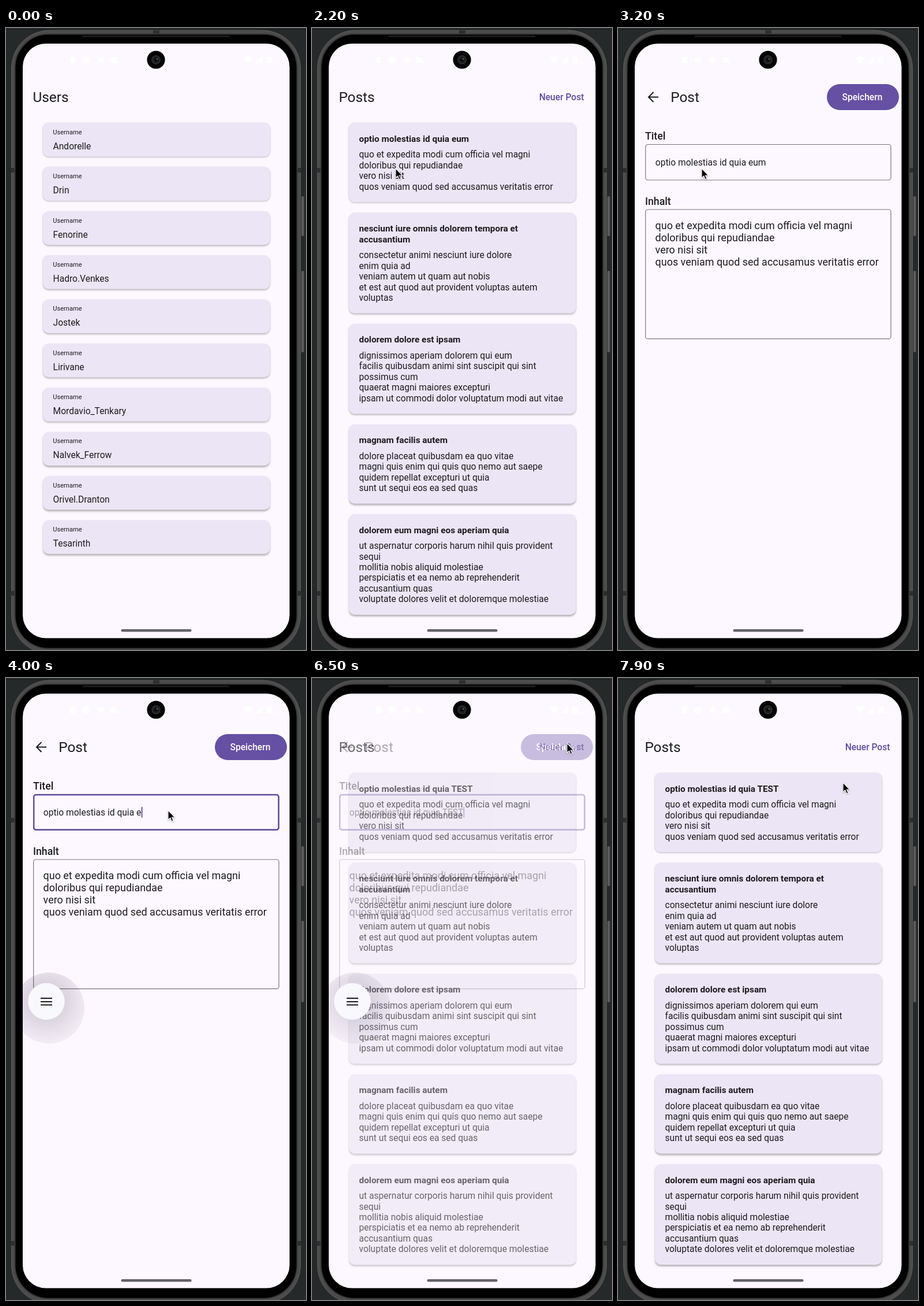
Animation, 520 px wide and 1076 px high, one loop 8000 ms. Source, as an HTML page:

```html
<!DOCTYPE html>
<html lang="de">
<head>
<meta charset="utf-8">
<title>Posts app</title>
<style>
html, body { margin: 0; width: 100%; height: 100%; overflow: hidden; background: #25292a; }
svg { display: block; width: 520px; height: 1076px; }
text { font-family: Roboto, sans-serif; font-size: 15.58px; fill: #1d1b20; white-space: pre; }
.title { font-size: 24.4px; }
.label { font-size: 11.1px; }
.head { font-size: 15.35px; font-weight: 700; }
.field { font-size: 17.8px; font-weight: 500; }
.area { font-size: 17.94px; }
.btn { font-weight: 500; }
.card { fill: #ebe5f5; }
.box { fill: none; stroke: #7a757f; stroke-width: 1.2; }

/* every change is a hard step */
.a {
  animation: 8s step-end infinite backwards;
  animation-delay: calc(var(--d, 0ms) - 20ms);
}
.usersText { animation-name: usersText; }
.usersCards { animation-name: usersCards; }
.postsBar { animation-name: postsBar; }
.postsText { animation-name: postsText; }
.postsCards { animation-name: postsCards; }
.form { animation-name: form; }
.spin { animation-name: spin; }
.focus { animation-name: focus; }
.fab { animation-name: fab; }
.halo { animation-name: halo; }
.caret { animation-name: focus, caret; }
.press { animation-name: press; }
.del { animation-name: del; }
.type { animation-name: type; }
.before { animation-name: before; }
.after { animation-name: after; }
.pointer { animation-name: pointer; }

@keyframes usersText {
  0% { opacity: 1 } 15% { opacity: .8 } 16.25% { opacity: .45 } 17.5% { opacity: .15 }
  18.75% { opacity: .035 } 20% { opacity: .02 } 21.25%, 100% { opacity: 0 }
}
@keyframes usersCards {
  0% { opacity: 1 } 15% { opacity: .95 } 16.25% { opacity: .8 } 17.5% { opacity: .6 }
  18.75% { opacity: .4 } 20% { opacity: .2 } 21.25%, 100% { opacity: 0 }
}
@keyframes postsBar {
  0% { opacity: 0 } 15% { opacity: .1 } 16.25% { opacity: .4 } 17.5% { opacity: .65 }
  18.75% { opacity: .82 } 20% { opacity: .92 } 21.25% { opacity: 1 }
  32.5% { opacity: .65 } 33.75% { opacity: .35 } 35% { opacity: .12 } 36.25% { opacity: 0 }
  80% { opacity: .3 } 81.25% { opacity: .65 } 82.5% { opacity: .9 } 83.75%, 100% { opacity: 1 }
}
@keyframes postsText {
  0% { opacity: 0 } 21.25% { opacity: .85 } 22.5% { opacity: .95 } 23.75% { opacity: 1 }
  32.5% { opacity: .65 } 33.75% { opacity: .33 } 35% { opacity: .12 } 36.25% { opacity: 0 }
  80% { opacity: .3 } 81.25% { opacity: .65 } 82.5% { opacity: .9 } 83.75%, 100% { opacity: 1 }
}
@keyframes postsCards {
  0% { opacity: 0 } 21.25% { opacity: .85 } 22.5% { opacity: .95 } 23.75% { opacity: 1 }
  32.5% { opacity: .45 } 33.75% { opacity: .12 } 35% { opacity: .05 } 36.25% { opacity: 0 }
  80% { opacity: .3 } 81.25% { opacity: .65 } 82.5% { opacity: .9 } 83.75%, 100% { opacity: 1 }
}
@keyframes form {
  0% { opacity: 0 } 32.5% { opacity: .25 } 33.75% { opacity: .56 } 35% { opacity: .8 }
  36.25% { opacity: .93 } 37.5% { opacity: 1 }
  80% { opacity: .7 } 81.25% { opacity: .35 } 82.5% { opacity: .1 } 83.75%, 100% { opacity: 0 }
}
@keyframes spin {
  0% { opacity: 0 }
  15% { opacity: .1; transform: rotate(-190deg) }
  16.25% { opacity: .4; transform: rotate(-130deg) }
  17.5% { opacity: .7; transform: rotate(-65deg) }
  18.75% { opacity: .88; transform: none }
  20% { opacity: .95; transform: rotate(70deg) }
  21.25%, 100% { opacity: 0 }
}
@keyframes focus { 0% { opacity: 0 } 45%, 100% { opacity: 1 } }
@keyframes fab { 0% { opacity: 0 } 46.25% { opacity: 1 } 85% { opacity: .5 } 86.25%, 100% { opacity: 0 } }
@keyframes halo { 0% { opacity: 1 } 81.25% { opacity: .75 } 82.5% { opacity: .55 } 83.75%, 100% { opacity: .4 } }
@keyframes caret {
  0% { transform: translateX(257.9px) } 48.75% { transform: translateX(244.2px) }
  50% { transform: translateX(235.6px) } 52.5% { transform: translateX(227.3px) }
  53.75% { transform: translateX(223.4px) } 57.5% { transform: translateX(227.3px) }
  60% { transform: translateX(236.4px) } 61.25% { transform: translateX(245.2px) }
  62.5% { transform: translateX(254.2px) } 63.75%, 100% { transform: translateX(263.3px) }
}
@keyframes press { 0% { fill: #6650a3 } 71.25% { fill: #6d58a7 } 72.5% { fill: #745fab } 77.5%, 100% { fill: #6650a3 } }
@keyframes del { 0% { fill-opacity: 1 } 48.75%, 100% { fill-opacity: 0 } }
@keyframes type { 0% { fill-opacity: 0 } 60%, 100% { fill-opacity: 1 } }
@keyframes before { 0% { fill-opacity: 1 } 60%, 100% { fill-opacity: 0 } }
@keyframes after { 0% { fill-opacity: 0 } 60%, 100% { fill-opacity: 1 } }
@keyframes pointer {
  0% { transform: translate(-40px, 900px) }
  6.25% { transform: translate(15px, 876px) }
  7.5% { transform: translate(60px, 760px) }
  8.75% { transform: translate(130px, 540px) }
  10% { transform: translate(195px, 360px) }
  11.25% { transform: translate(225px, 274px) }
  25% { transform: translate(210px, 268px) }
  26.25% { transform: translate(170px, 253px) }
  27.5% { transform: translate(145px, 243px) }
  43.75% { transform: translate(190px, 239px) }
  45% { transform: translate(250px, 232px) }
  46.25% { transform: translate(281px, 229px) }
  66.25% { transform: translate(305px, 212px) }
  67.5% { transform: translate(360px, 172px) }
  68.75% { transform: translate(415px, 132px) }
  70% { transform: translate(442px, 113px) }
  85% { transform: translate(430px, 122px) }
  86.25% { transform: translate(380px, 165px) }
  87.5% { transform: translate(300px, 215px) }
  88.75% { transform: translate(235px, 248px) }
  90% { transform: translate(199px, 254px) }
  91.25% { transform: translate(212px, 246px) }
  92.5% { transform: translate(250px, 225px) }
  93.75% { transform: translate(300px, 198px) }
  95% { transform: translate(345px, 175px) }
  96.25% { transform: translate(375px, 167px) }
  97.5% { transform: translate(386px, 173px) }
  98.75%, 100% { transform: translate(390px, 181px) }
}
</style>
</head>
<body>
<svg viewBox="0 0 520 1076">
  <defs>
    <clipPath id="screen"><rect x="29" y="27" width="462.5" height="1028.5" rx="40"/></clipPath>
    <radialGradient id="glow" cx=".46" cy=".4" r=".62">
      <stop offset=".45" stop-color="#35203f" stop-opacity=".16"/>
      <stop offset=".75" stop-color="#35203f" stop-opacity=".09"/>
      <stop offset="1" stop-color="#35203f" stop-opacity=".05"/>
    </radialGradient>
  </defs>

  <!-- phone body -->
  <rect width="520" height="1076" fill="#25292a"/>
  <path d="M0 2.5H520" stroke="#1a1d1e"/>
  <g fill="#5c5c5c">
    <rect x="512" y="291" width="4.500" height="69" rx="2"/>
    <rect x="512" y="420" width="4.500" height="141" rx="2"/>
  </g>
  <rect x="9.500" y="4" width="501" height="1078" rx="66" fill="#4c4c4b" stroke="#5b5b5a"/>
  <g fill="#2f2f2f">
    <rect x="255" y="4" width="11" height="7"/>
    <path d="M9 242h6v8h-6zM505 242h6v8h-6zM9 974h6v8h-6zM505 974h6v8h-6z"/>
  </g>
  <rect x="15.500" y="10.500" width="489" height="1063" rx="58" fill="#000" stroke="#383838" stroke-width="2"/>
  <path d="M134 14.500H386" stroke="#1b1b1b" stroke-width="3" stroke-linecap="round"/>

  <g clip-path="url(#screen)">
    <rect x="29" y="27" width="463" height="1029" fill="#fdf8ff"/>

    <!-- status icons -->
    <g fill="#fff">
      <path d="M412 52q7.500-6 15 0l-7.500 10zM432 61l12-12v12zM451 50h10v11h-10zM466 59h2v2h-2zM470 59h2v2h-2z"/>
      <path d="M111 50h8v11h-8zM181 51h8l6 9h-14z"/>
      <circle cx="138" cy="55" r="6"/><circle cx="164" cy="55" r="5"/>
    </g>

    <g id="usersCards" class="a usersCards"></g>
    <g id="usersText" class="a usersText"><text class="title" x="46.400" y="127.800">Users</text></g>

    <g id="postsCards" class="a postsCards"></g>
    <g id="postsText" class="a postsText"></g>
    <g class="a postsBar">
      <text class="title" x="46.400" y="127.800">Posts</text>
      <text class="btn" x="393.700" y="125.200" style="fill:#5d4a9c">Neuer Post</text>
    </g>
    <g transform="translate(260.500 591.800)">
      <path class="a spin" d="M19.200-6.900A20.400 20.400 0 1 1-19.200-6.900" fill="none" stroke="#1d1b20" stroke-width="4" stroke-linecap="round"/>
    </g>

    <g class="a form">
      <path d="M70 119.500H53.500M61.500 111l-8.500 8.500 8.500 8.500" fill="none" stroke="#1d1b20" stroke-width="2.100"/>
      <text class="title" x="91.200" y="127.800">Post</text>
      <rect class="a press" x="362" y="97" width="125" height="45" rx="22.500" fill="#6650a3"/>
      <text class="btn" x="388.500" y="125.200" style="fill:#fff">Speichern</text>

      <text class="field" x="46.900" y="193.200">Titel</text>
      <rect class="box" x="47.700" y="201.500" width="425.300" height="61.500" rx="4"/>
      <rect class="a focus" x="48.200" y="202" width="424.300" height="60.500" rx="4" fill="none" stroke="#5c499b" stroke-width="2.400"/>
      <text x="64.800" y="237.500">optio molestias id quia <tspan class="a del" style="--d:300ms">e</tspan><tspan class="a del" style="--d:100ms">u</tspan><tspan class="a del">m</tspan></text>
      <text x="64.800" y="237.500"><tspan fill-opacity="0">optio molestias id quia </tspan><tspan class="a type">T</tspan><tspan class="a type" style="--d:100ms">E</tspan><tspan class="a type" style="--d:200ms">S</tspan><tspan class="a type" style="--d:300ms">T</tspan></text>
      <rect class="a caret" x="-1" y="223" width="1.900" height="18.500" fill="#6650a3"/>

      <text class="field" x="46.900" y="305.800">Inhalt</text>
      <rect class="box" x="47.700" y="314" width="425.300" height="223.700" rx="4"/>
      <g id="content"></g>
    </g>

    <g class="a fab">
      <circle class="a halo" cx="74.500" cy="571" r="61.500" fill="url(#glow)"/>
      <circle cx="70" cy="559.500" r="31.700" fill="#f9f8fd"/>
      <path d="M60 554H80M60 560H80M60 565.500H80" stroke="#1d1b20" stroke-width="2.100"/>
    </g>

    <rect x="199.500" y="1040" width="122" height="4.400" rx="2.200" fill="#656269"/>
  </g>

  <!-- camera -->
  <circle cx="260" cy="55" r="15.600" fill="#050505"/>
  <circle cx="260" cy="55" r="7" fill="#1d1e1f" stroke="#303233" stroke-width="1.500"/>
  <circle cx="260" cy="55" r="3" fill="#0b0c0d"/>
  <circle cx="262" cy="53.500" r="1.500" fill="#555"/>

  <g class="a pointer">
    <path d="M0 0V16.500L3.800 13 6.300 19 9 17.800 6.500 12H11.800Z" fill="#000" stroke="#fff" stroke-width="1.100" style="filter:drop-shadow(0 1px 1px #0005)"/>
  </g>
</svg>
<script>
const LINE = 18.45;
const add = (id, html) => document.getElementById(id).insertAdjacentHTML('beforeend', html);
const text = (x, y, s, cls = '') => `<text class="${cls}" x="${x}" y="${y}">${s}</text>`;

// the shadow drops lower the further down a card sits
const card = (y, h) => `<rect class="card" x="64" y="${y}" width="393.5" height="${h}" rx="10"
  style="filter:drop-shadow(0 ${1.2 + y / 350}px 1.8px #0004)"/>`;

const users = ['Andorelle', 'Drin', 'Fenorine', 'Hadro.Venkes', 'Jostek', 'Lirivane',
  'Mordavio_Tenkary', 'Nalvek_Ferrow', 'Orivel.Dranton', 'Tesarinth'];
users.forEach((name, i) => {
  const y = 164 + i * 76.35;
  add('usersCards', card(y, 58.5));
  add('usersText', text(81.3, y + 20, 'Username', 'label') + text(81.6, y + 46, name));
});

const first = ['quo et expedita modi cum officia vel magni', 'doloribus qui repudiandae',
  'vero nisi sit', 'quos veniam quod sed accusamus veritatis error'];
const posts = [
  [['optio molestias id quia <tspan class="a before">eum</tspan>'], first],
  [['nesciunt iure omnis dolorem tempora et', 'accusantium'],
    ['consectetur animi nesciunt iure dolore', 'enim quia ad', 'veniam autem ut quam aut nobis',
      'et est aut quod aut provident voluptas autem', 'voluptas']],
  [['dolorem dolore est ipsam'],
    ['dignissimos aperiam dolorem qui eum', 'facilis quibusdam animi sint suscipit qui sint',
      'possimus cum', 'quaerat magni maiores excepturi',
      'ipsam ut commodi dolor voluptatum modi aut vitae']],
  [['magnam facilis autem'],
    ['dolore placeat quibusdam ea quo vitae', 'magni quis enim qui quis quo nemo aut saepe',
      'quidem repellat excepturi ut quia', 'sunt ut sequi eos ea sed quas']],
  [['dolorem eum magni eos aperiam quia'],
    ['ut aspernatur corporis harum nihil quis provident', 'sequi',
      'mollitia nobis aliquid molestiae', 'perspiciatis et ea nemo ab reprehenderit',
      'accusantium quas', 'voluptate dolores velit et doloremque molestiae']]
];
let cardY = 164;
posts.forEach(([head, body]) => {
  const h = 45.1 + (head.length + body.length) * LINE;
  let y = cardY + 32.8;
  add('postsCards', card(cardY, h));
  head.forEach(s => { add('postsText', text(81.5, y, s, 'head')); y += LINE; });
  y += 9.1;
  body.forEach(s => { add('postsText', text(81.5, y, s)); y += LINE; });
  cardY += h + 18;
});
add('postsText', text(81.5, 196.8,
  '<tspan fill-opacity="0">optio molestias id quia </tspan><tspan class="a after">TEST</tspan>', 'head'));

first.forEach((s, i) => add('content', text(64.6, 347.8 + i * 21, s, 'area')));
</script>
</body>
</html>
```
